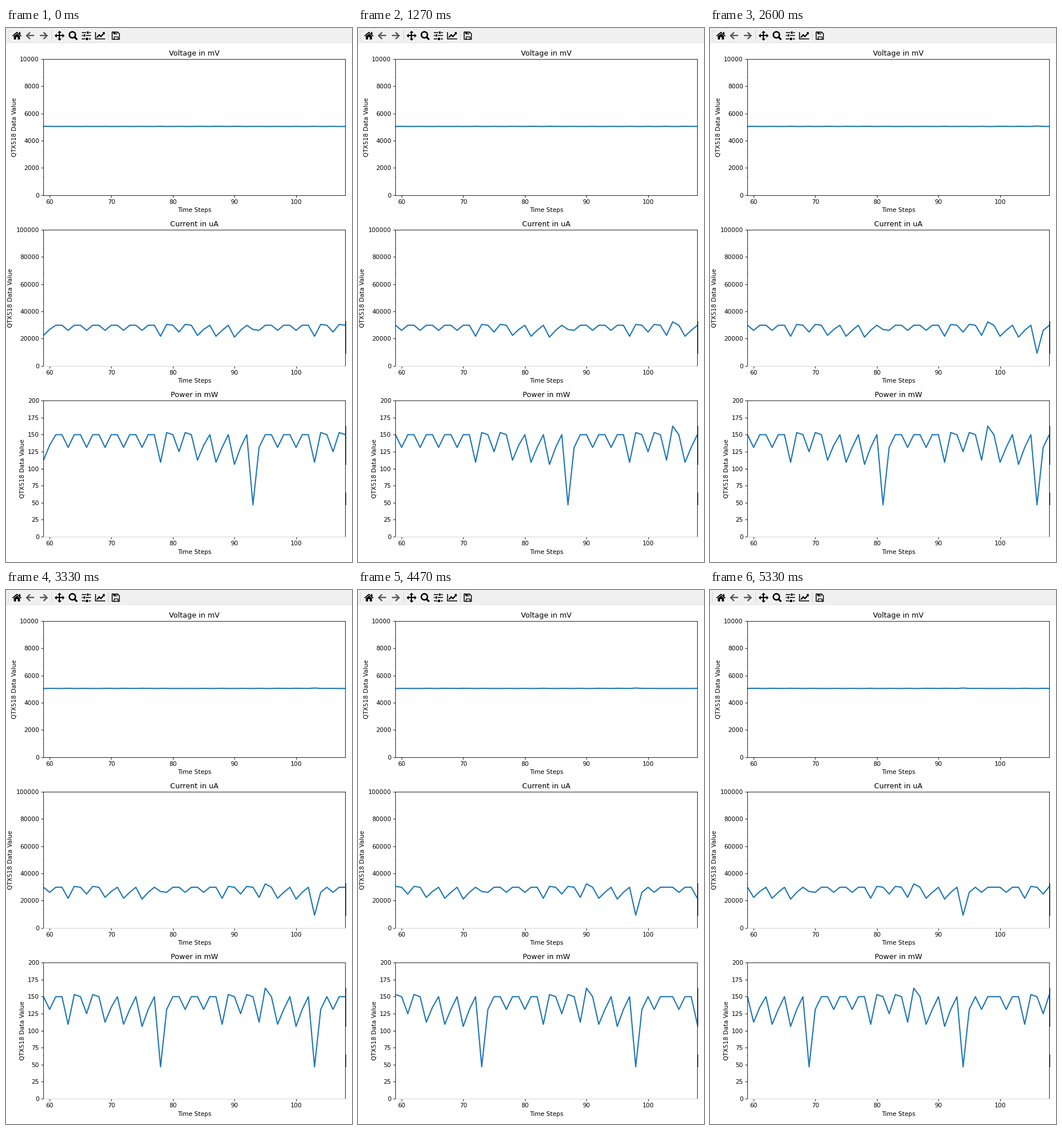
These frames come from a looping animation (603x929 px, 5.59 s). A matplotlib script:

```python
import math

import matplotlib.pyplot as plt
import numpy as np
from matplotlib.animation import FuncAnimation
from matplotlib.patches import Circle, Polygon, Rectangle

W, H, DPI = 603, 929, 76
FRAMES, INTERVAL = 130, 43
WINDOW, STEPS = 50, 24
X = np.arange(59, 59 + WINDOW)
LEFT, RIGHT, PLOT_H = 65.3, 591.4, 236.7
SENSOR = "QTX518"

# The load dips every third sample; (dip, recovery) levels repeat in a cycle
IDLE = 48
CYCLE = [(42, 48), (42, 48), (35, 49), (40, 49),
         (36, 43), (35, 42), (34, 42), (15, 42)]
SLIPS = (1, 12, 21)  # dips that come one sample late
SURGE, GLITCH = 51, 34


def load_levels():
    levels = np.full(WINDOW + STEPS, IDLE)
    for n in range(24):
        step = 3 * n + sum(n >= slip for slip in SLIPS)
        phase = 0 if 1 <= n <= 3 else (n - 4) % len(CYCLE)
        levels[step:step + 2] = CYCLE[phase]
    levels[SURGE] = 52
    return levels


def current_from(levels):
    # The first deep drop appears in the power reading only
    steady = levels.copy()
    steady[GLITCH] = 43
    return 622 * steady


LEVELS = load_levels()
POWER = 3.125 * LEVELS
CURRENT = current_from(LEVELS)
# The supply rises slightly whenever the load drops
VOLTAGE = 5040 + 0.0016 * (30000 - CURRENT)

# Samples arrive on a 1/15 s clock, rounded down to 10 ms
ARRIVALS = [math.floor(3.41 * k - 1) * 100 // 15 * 10
            for k in range(1, STEPS + 1)]


def px(value):
    return value * 72 / DPI


fig = plt.figure(figsize=((W + 1e-6) / DPI, (H + 1e-6) / DPI), dpi=DPI,
                 facecolor="white")
plt.rcParams.update({"font.family": "DejaVu Sans", "font.size": 10})


def make_plot(title, top, y_max, y_step, bottom_color):
    ax = fig.add_axes([LEFT / W, 1 - (top + PLOT_H) / H,
                       (RIGHT - LEFT) / W, PLOT_H / H])
    ax.set(xlim=(X[0], X[-1]), ylim=(0, y_max),
           xticks=range(60, 101, 10), yticks=range(0, y_max + 1, y_step))
    ax.set_title(title, fontsize=12)
    ax.set_xlabel("Time Steps")
    ax.set_ylabel(f"{SENSOR} Data Value")
    ax.spines["bottom"].set_color(bottom_color)
    return ax.plot([], [], color="#1f77b4", lw=2)[0]


PLOTS = [
    (make_plot("Voltage in mV", 53.9, 10000, 2000, "black"), VOLTAGE),
    (make_plot("Current in uA", 351.1, 100000, 20000, "#cccccc"), CURRENT),
    (make_plot("Power in mW", 648.3, 200, 25, "#cccccc"), POWER),
]

# Overlay in pixel coordinates, y pointing down
ui = fig.add_axes([0, 0, 1, 1], zorder=5)
ui.set(xlim=(0, W), ylim=(H, 0))
ui.axis("off")


def rect(x, y, w, h, color="black", **kw):
    ui.add_patch(Rectangle((x, y), w, h, fc=color, lw=0, **kw))


def poly(points, color="black"):
    ui.add_patch(Polygon(points, fc=color, lw=0))


def stroke(points, width, color="black", cap="butt"):
    xs, ys = zip(*points)
    ui.plot(xs, ys, color=color, lw=px(width), solid_capstyle=cap,
            solid_joinstyle="miter")


def home_icon():
    stroke([(11.5, 14), (19, 7.6), (26.5, 14)], 1.8)
    rect(22.9, 7.4, 2, 4)
    poly([(13.7, 14.3), (19, 9.9), (24.3, 14.3), (24.3, 20), (20.6, 20),
          (20.6, 15.8), (17.4, 15.8), (17.4, 20), (13.7, 20)])


def arrow_icon(x, direction):
    tip = x + 6 * direction
    stroke([(x - 7 * direction, 13.3), (tip - direction, 13.3)], 2.3, "#595959")
    stroke([(x, 7.5), (tip, 13.3), (x, 19.1)], 2.4, "#595959")


def move_icon(x, y):
    stroke([(x - 7, y), (x + 7, y)], 2.1)
    stroke([(x, y - 7), (x, y + 7)], 2.1)
    for dx, dy in ((1, 0), (-1, 0), (0, 1), (0, -1)):
        base = x + 5 * dx, y + 5 * dy
        poly([(x + 8.7 * dx, y + 8.7 * dy),
              (base[0] + 3.6 * dy, base[1] + 3.6 * dx),
              (base[0] - 3.6 * dy, base[1] - 3.6 * dx)])


def zoom_icon():
    ui.add_patch(Circle((115.7, 11.9), 5.3, fc="none", ec="black", lw=px(2.5)))
    stroke([(119.5, 15.7), (123.3, 19.5)], 3, cap="round")


def sliders_icon():
    for y, knob in ((8, 142.5), (13.4, 136.5), (18.8, 141)):
        stroke([(132.3, y), (148, y)], 1.5)
        rect(knob - 2.6, y - 2.4, 5.2, 4.8, "#f0f0f0", zorder=3)
        rect(knob - 1.6, y - 2.1, 3.2, 4.2, zorder=4)


def chart_icon():
    stroke([(156.2, 7), (156.2, 19.5), (173, 19.5)], 1.5)
    stroke([(158.3, 16.5), (162.5, 12), (165.4, 14.8), (170.5, 9.4)], 2.2)
    poly([(167.6, 7.4), (172.4, 7.4), (172.4, 12.2)])


def save_icon():
    stroke([(185, 7), (194.5, 7), (197.6, 10), (197.6, 19.6), (185, 19.6),
            (185, 6.4)], 1.5)
    rect(187.2, 7, 6.4, 4.4)
    rect(191.2, 7.8, 1.5, 2.7, "#f0f0f0", zorder=3)
    stroke([(187.6, 19.6), (187.6, 15), (195, 15), (195, 19.6)], 1.3)


def draw_toolbar():
    rect(0, 0, W, 25, "#f0f0f0")
    rect(0, 25, W, 1, "#dfdfdf")
    for y in range(5, 22, 4):
        rect(4, y, 1.2, 1.2, "#a0a0a0")
    for x in (79, 178):
        rect(x, 4, 1, 18, "#d4d4d4")
    home_icon()
    arrow_icon(42, -1)
    arrow_icon(65.5, 1)
    move_icon(93.4, 13.4)
    zoom_icon()
    sliders_icon()
    chart_icon()
    save_icon()


def draw_edge_marks():
    for top in (54, 351, 648):
        for k in range(5):
            rect(64.2, top + 32 + 43 * k, 1, 1, alpha=0.45)
    for y0, y1 in ((510, 567), (692, 760), (808, 830)):
        rect(591.6, y0, 1, y1 - y0, alpha=0.7)


def update(frame):
    end = (frame + 1) * INTERVAL
    shift = sum(t < end for t in ARRIVALS)
    for line, values in PLOTS:
        line.set_data(X, values[shift:shift + WINDOW])
    return [line for line, _ in PLOTS]


draw_toolbar()
draw_edge_marks()
anim = FuncAnimation(fig, update, frames=FRAMES, interval=INTERVAL,
                     repeat=True, repeat_delay=0, blit=False)
plt.show()
```
